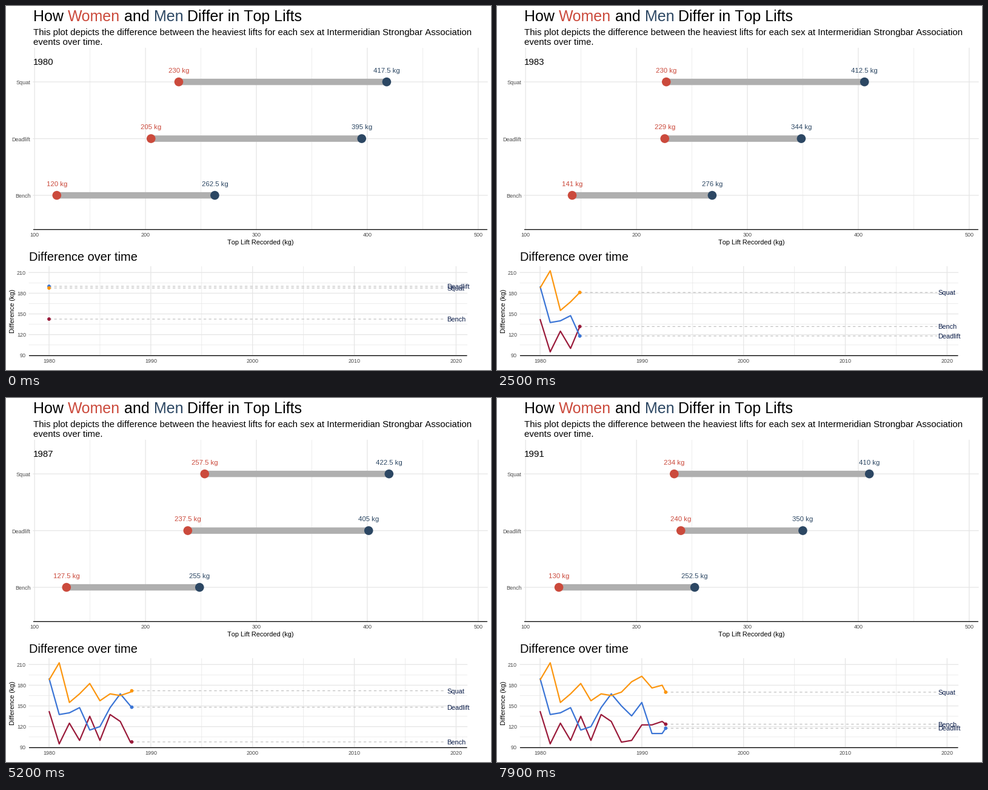
Recreate the animation shown at these times as a matplotlib script. Size 800 by 600 pixels, loop 8 s.

```python
import numpy as np
import matplotlib.pyplot as plt
from matplotlib.animation import FuncAnimation
from matplotlib.patches import Circle

plt.rcParams["font.family"] = "Liberation Sans"
plt.rcParams["text.kerning_factor"] = 6  # plain advances, no pair kerning

W, H, DPI = 800, 600, 100
FRAMES, INTERVAL = 80, 100
PT = 72 / DPI  # points per pixel

RED, BLUE, INK, NAVY = "#cb4a3c", "#2c4763", "#4d4d4d", "#0a1c48"
FIRST_YEAR = 1980
YEARS_PER_FRAME = 0.1563
HOLD, MOVE = 7.08, 4  # frames from one year to the next, frames in motion

# Women's lifts are interpolated between these years
KEY_YEARS = [0, 3, 5, 6, 7, 9, 11]

# name, line colour, women's lifts at the key years, yearly lead of the men
LIFTS = [
    ("Squat", "#fc960f",
     [230, 217.5, 242.5, 230, 257.5, 225, 234],
     [187.5, 212.5, 155, 167.5, 182.5, 157.5, 167.5,
      165, 170, 185, 193, 176, 180, 151]),
    ("Deadlift", "#3b75d6",
     [205, 215, 242.5, 205, 237.5, 242.5, 240],
     [190, 137.5, 140, 147.5, 115, 120, 147.5,
      167.5, 150, 135.5, 155, 110, 110, 132]),
    ("Bench", "#9a1b3b",
     [120, 145, 137.5, 117.5, 127.5, 137.5, 130],
     [142.5, 95, 125, 100, 135, 100, 137.5,
      127.5, 97.5, 100, 122.5, 122.5, 127.5, 116]),
]


def kg_x(kg):
    return 47.2 + (kg - 100) * 1.829


def row_y(i):
    return 125.1 + 93.5 * i


def year_x(years):
    return 71 + years * 16.785


def gap_y(gap):
    return 575.8 - (gap - 90) * 1.1375


fig = plt.figure(figsize=(W / DPI, H / DPI), dpi=DPI, facecolor="white")
ax = fig.add_axes([0, 0, 1, 1])
ax.set_xlim(0, W)
ax.set_ylim(H, 0)
ax.axis("off")


def text(x, y, s, px, color="black", ha="left", **kw):
    return ax.text(x, y, s, fontsize=px * PT, color=color, ha=ha,
                   va="baseline", zorder=6, **kw)


def line(xs, ys, color, px, z, **kw):
    return ax.plot(xs, ys, color=color, lw=px * PT, zorder=z, snap=False,
                   **kw)[0]


def dot(radius, color, z):
    return ax.add_patch(Circle((0, 0), radius, fc=color, ec="none", zorder=z))


def grid(box, xs, ys, px):
    x0, x1, y0, y1 = box
    for x in xs:
        line([x, x], [y0, y1], "#e6e6e6", px, 1)
    for y in ys:
        line([x0, x1], [y, y], "#e6e6e6", px, 1)


def base_line(box):
    x0, x1, _, y = box
    line([x0, x1], [y, y], "black", 1.3, 2, solid_capstyle="butt")


def draw_lift_panel():
    box = (45, 794, 69.5, 368.5)
    ticks = np.arange(100, 501, 100)
    grid(box, kg_x(ticks[:-1] + 50), [], 0.7)
    grid(box, kg_x(ticks), [row_y(i) for i in range(len(LIFTS))], 1.3)
    base_line(box)
    for kg in ticks:
        text(kg_x(kg), 380.3, str(kg), 9, INK, "center")
    for i, (name, *_) in enumerate(LIFTS):
        text(40.5, row_y(i) + 4, name, 9, INK, "right")
    text(420, 393, "Top Lift Recorded (kg)", 11, ha="center")


def draw_gap_panel():
    box = (38, 760.5, 429.5, 576.4)
    years, gaps = np.arange(0, 41, 10), np.arange(90, 211, 30)
    text(38, 420, "Difference over time", 20)
    grid(box, year_x(years[:-1] + 5), gap_y(gaps[:-1] + 15), 0.7)
    grid(box, year_x(years), gap_y(gaps), 1.3)
    base_line(box)
    for n in years:
        text(year_x(n), 588, str(FIRST_YEAR + n), 9, INK, "center")
    for gap in gaps:
        text(33, gap_y(gap) + 3.5, str(gap), 9, INK, "right")
    text(14, 503, "Difference (kg)", 11, ha="center", rotation=90,
         rotation_mode="anchor")


def draw_heading():
    for x, words, color in [(45, "How", "black"), (102, "Women", RED),
                            (195, "and", "black"), (243.7, "Men", BLUE),
                            (299.3, "Differ in Top Lifts", "black")]:
        text(x, 25, words, 25, color)
    text(45, 48, "This plot depicts the difference between the heaviest lifts "
         "for each sex at Intermeridian Strongbar Association", 15)
    text(45, 64, "events over time.", 15)


class Lift:
    """One dumbbell row and its difference line."""

    def __init__(self, i, name, color, women, gaps):
        self.y = row_y(i)
        self.gaps = np.array(gaps)
        self.years = np.arange(len(gaps))
        women = np.round(2 * np.interp(self.years, KEY_YEARS, women)) / 2
        self.kgs = np.column_stack([women, women + self.gaps])

        z = 5 - 0.1 * i
        self.bar = line([], [], "#afafaf", 10.5, 2, solid_capstyle="butt")
        self.dots = [dot(7.3, c, 3) for c in (RED, BLUE)]
        self.labels = [text(0, self.y - 15.2, "", 11.4, c, "center")
                       for c in (RED, BLUE)]
        self.dash = line([], [], "#b3b3b3", 1, 3, linestyle=(0, (4.25, 4.25)),
                         dash_capstyle="butt")
        self.path = line([], [], color, 2.2, z, solid_joinstyle="round",
                         solid_capstyle="butt")
        self.tip = dot(2.9, color, z)
        self.name = text(727, 0, name, 11, NAVY)

    def set_lifts(self, k, p):
        xs = kg_x(self.kgs[k] * (1 - p) + self.kgs[k + 1] * p)
        shown = self.kgs[k + (p >= 0.5)]
        self.bar.set_data(xs, [self.y, self.y])
        for x, kg, mark, label in zip(xs, shown, self.dots, self.labels):
            mark.center = (x, self.y)
            label.set_x(x)
            label.set_text(f"{kg:g} kg")

    def set_gap(self, t):
        past = self.years[:int(t) + 1]
        x, y = year_x(t), gap_y(np.interp(t, self.years, self.gaps))
        self.path.set_data(np.append(year_x(past), x),
                           np.append(gap_y(self.gaps[past]), y))
        self.tip.center = (x, y)
        self.dash.set_data([x, year_x(39)], [y, y])
        self.name.set_y(y + 4)


def state(frame):
    """Year held or being left, and the share of the move done."""
    k = 0
    while frame >= round(1 + HOLD * k) + MOVE:
        k += 1
    return k, max(0, frame - round(1 + HOLD * k)) / MOVE


draw_heading()
draw_lift_panel()
draw_gap_panel()
year_label = text(45, 97, "", 15)
lifts = [Lift(i, *spec) for i, spec in enumerate(LIFTS)]


def update(frame):
    k, p = state(frame)
    year_label.set_text(str(FIRST_YEAR + k))
    for lift in lifts:
        lift.set_lifts(k, p)
        lift.set_gap(frame * YEARS_PER_FRAME)
    return []


anim = FuncAnimation(fig, update, frames=FRAMES, interval=INTERVAL,
                     repeat=True, repeat_delay=0, blit=False)
plt.show()
```
